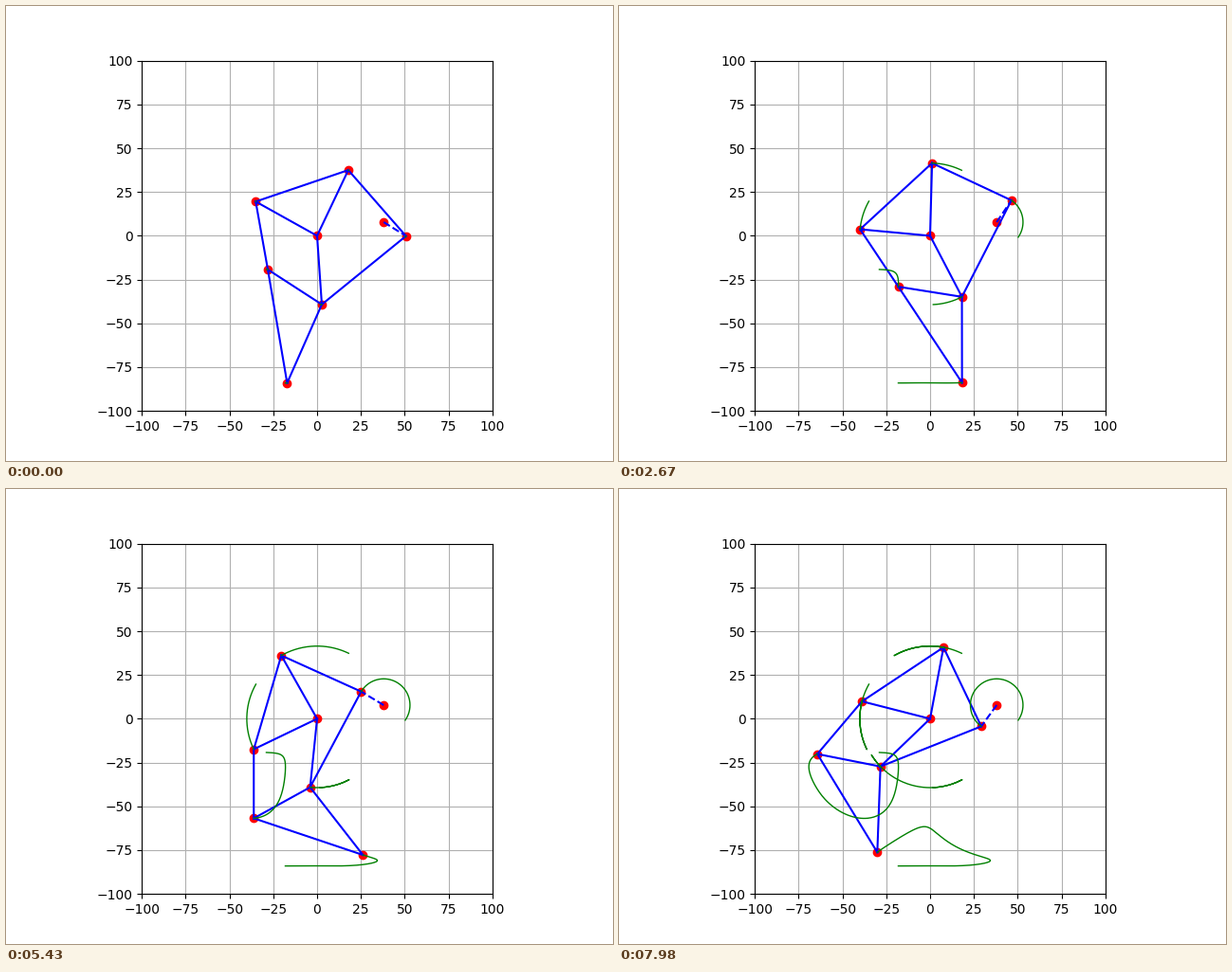
Animation of 640 by 480 pixels, one loop 8000 ms. Source, as a matplotlib script:

```python
import numpy as np
import matplotlib.pyplot as plt
from matplotlib.animation import FuncAnimation

LOOP, INTERVAL, STEP = 8000, 25, 30   # ms
POSES = 267
LEAD = 3                              # degrees of trail before the first pose
START = -32                           # crank angle of the first pose

CENTER = 38 + 7.8j
CRANK = 15


def meet(p, q, rp, rq, side):
    """Intersection of two circles; side +1 lies left of p -> q."""
    d = q - p
    dist = np.abs(d)
    a = (rp**2 - rq**2 + dist**2) / (2 * dist)
    h = np.sqrt(rp**2 - a**2)
    return p + d / dist * (a + side * 1j * h)


# Every pose of the leg linkage, one degree of crank per step
angle = np.radians(START - LEAD + np.arange(POSES + LEAD))
pin = CENTER + CRANK * np.exp(1j * angle)
hub = np.zeros_like(pin)
pivot = np.full_like(pin, CENTER)
top = meet(hub, pin, 41.5, 50, 1)
low = meet(hub, pin, 39.3, 61.9, -1)
left = meet(hub, top, 40.1, 55.8, 1)
knee = meet(left, low, 39.4, 36.7, -1)
foot = meet(knee, low, 65.7, 49, -1)

joints = [hub, pivot, pin, top, low, left, knee, foot]
bars = [(pin, top), (pin, low), (hub, top), (hub, low), (hub, left),
        (top, left), (left, knee), (low, knee), (knee, foot), (low, foot)]
traced = [pin, top, low, left, knee, foot]

fig, ax = plt.subplots(figsize=(6.4, 4.8), dpi=100)
ax.set_aspect("equal")
ax.set(xlim=(-100, 100), ylim=(-100, 100))
ticks = np.arange(-100, 101, 25)
ax.set_xticks(ticks)
ax.set_yticks(ticks)
ax.grid(True)

dots, = ax.plot([], [], "ro")
frame_line, = ax.plot([], [], "b-", lw=1.5)
crank_line, = ax.plot([], [], "b--", lw=1.5)
trails = [ax.plot([], [], "g-", lw=1)[0] for _ in traced]


def put(line, z):
    z = np.asarray(z)
    line.set_data(z.real, z.imag)


def update(i):
    n = (i * INTERVAL + INTERVAL // 2) // STEP + LEAD
    gap = complex(np.nan, np.nan)
    put(dots, [j[n] for j in joints])
    put(frame_line, [z for a, b in bars for z in (a[n], b[n], gap)])
    put(crank_line, [CENTER, pin[n]])
    for line, path in zip(trails, traced):
        put(line, path[:n + 1])
    return [dots, frame_line, crank_line, *trails]


anim = FuncAnimation(fig, update, frames=LOOP // INTERVAL, interval=INTERVAL,
                     init_func=lambda: update(0), repeat=True,
                     repeat_delay=0, blit=False)
plt.show()
```
